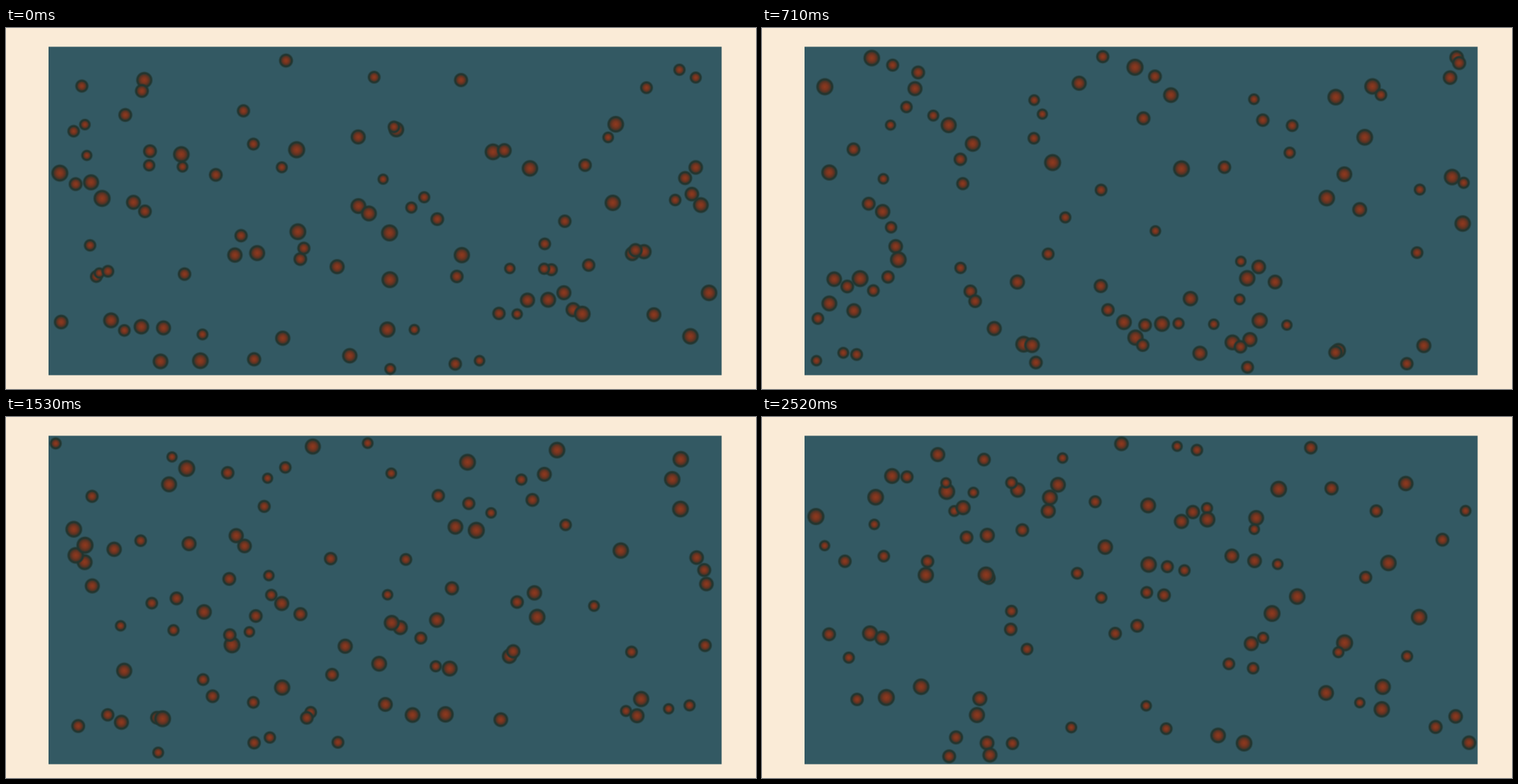
An HTML page with a canvas that plays this animation: 1058 by 510 pixels, repeating every 2570 ms.

```html
<!DOCTYPE html>
<html lang="en">
<head>
<meta charset="utf-8">
<title>Bouncing balls</title>
<style>
  html, body { margin: 0; width: 100%; height: 100%; overflow: hidden; background: #faebd7; }
  canvas { display: block; }
</style>
</head>
<body>
<canvas id="stage" width="1058" height="510"></canvas>
<script>
const ctx = document.getElementById('stage').getContext('2d');
const box = { left: 60, top: 26.5, right: 1009.5, bottom: 490.5 };
const LOOP = 2570, STEPS = 40, SPEED = 14.96;
const BIG = 12.4, SMALL = 8.2;
const RIM = '#22352f';

// Start x, start y, heading in tenths of a degree; ordered from the largest ball to the smallest.
const starts = [
  [410, 172, -451], [76, 205, 1151], [687, 175, -72], [813, 404, -957],
  [856, 247, -882], [538, 426, -44], [120, 218, -294], [512, 262, 715],
  [218, 471, -80], [191, 422, -1559], [485, 463, 435], [900, 316, 1219],
  [787, 374, 270], [914, 405, -1155], [703, 173, 908], [973, 197, -876],
  [888, 314, 1187], [350, 468, -390], [958, 212, -811], [395, 46, -145],
  [196, 259, 505], [636, 351, 763], [822, 335, 578], [335, 117, -277],
  [107, 82, -1577], [349, 164, 706], [760, 305, 43], [944, 243, -1155],
  [202, 194, 617], [950, 59, 760], [973, 70, 1059], [542, 482, -368],
  [249, 196, -349], [668, 470, 874], [576, 426, -22], [114, 180, -1649]
];

let seed = 2024;
function random() {
  seed = (seed * 1664525 + 1013904223) % 4294967296;
  return seed / 4294967296;
}
const between = (a, b) => a + (b - a) * random();

function makeBall(x, y, degrees, r) {
  const a = degrees * Math.PI / 180;
  return { x, y, r, vx: SPEED * Math.cos(a), vy: SPEED * Math.sin(a) };
}

// The rest of the swarm drifts mostly to the left.
const drifters = Array.from({ length: 64 }, () =>
  makeBall(72 + 920 * random() ** 1.3, between(40, 475), between(80, 290), between(SMALL, BIG)));

const leaders = starts.map(([x, y, heading], i) =>
  makeBall(x, y, heading / 10, BIG + (SMALL - BIG) * i / (starts.length - 1)));

const balls = [...drifters, ...leaders];

// Reflects a straight path between two walls.
function bounce(p, lo, hi) {
  const span = hi - lo;
  const u = (((p - lo) % (2 * span)) + 2 * span) % (2 * span);
  return lo + (u > span ? 2 * span - u : u);
}

function disc(x, y, r, fill) {
  ctx.fillStyle = fill;
  ctx.beginPath();
  ctx.arc(x, y, r, 0, 2 * Math.PI);
  ctx.fill();
}

function drawBall(x, y, r) {
  const soft = ctx.createRadialGradient(x, y, r - 1.5, x, y, r + 0.8);
  soft.addColorStop(0, RIM);
  soft.addColorStop(1, 'rgba(34, 53, 47, 0)');
  disc(x, y, r + 0.8, soft);

  const core = ctx.createRadialGradient(x, y, 0, x, y, r - 2.5);
  core.addColorStop(0, '#8e391e');
  core.addColorStop(0.4, '#7b351f');
  core.addColorStop(0.75, '#553324');
  core.addColorStop(1, RIM);
  disc(x, y, r - 2.5, core);
}

function draw(step) {
  ctx.fillStyle = '#faebd7';
  ctx.fillRect(0, 0, 1058, 510);
  ctx.fillStyle = '#335963';
  ctx.fillRect(box.left, box.top, box.right - box.left, box.bottom - box.top);
  for (const b of balls) {
    drawBall(
      bounce(b.x + b.vx * step, box.left + b.r, box.right - b.r),
      bounce(b.y + b.vy * step, box.top + b.r, box.bottom - b.r),
      b.r);
  }
}

const begin = performance.now();
function tick() {
  const t = (performance.now() - begin) % LOOP;
  draw(Math.min(STEPS - 1, Math.floor((t + 12.5) * STEPS / LOOP)));
  requestAnimationFrame(tick);
}
tick();
</script>
</body>
</html>
```
